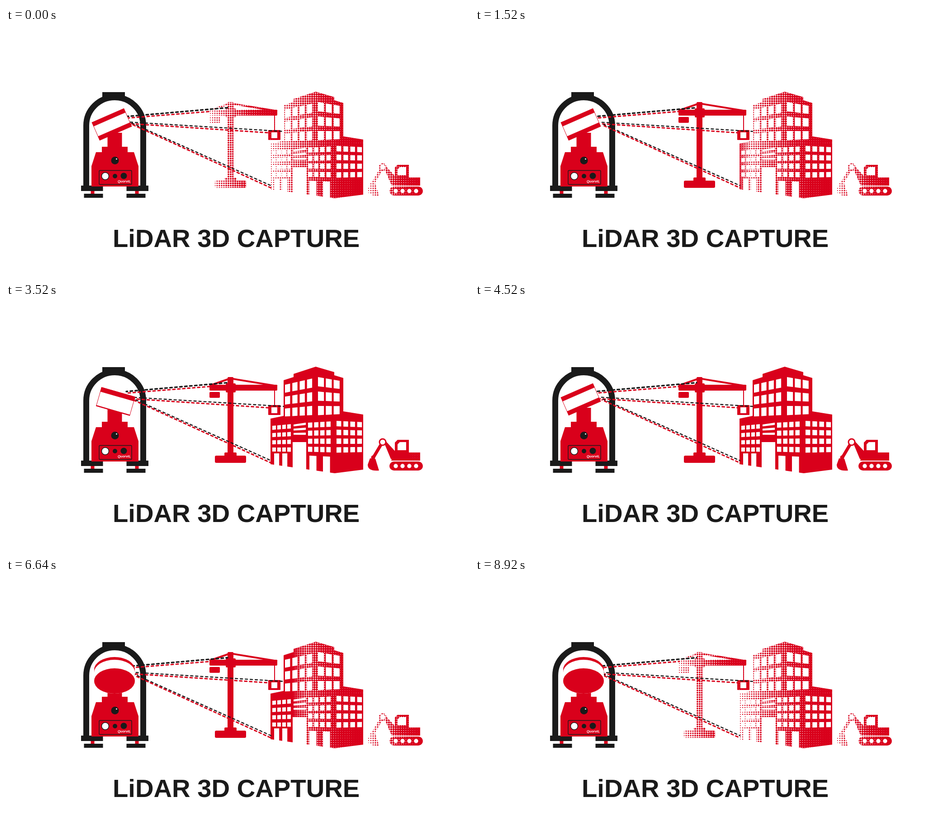
Write an HTML page that moves like this. It is 1024x547 px and loops after 8.96 s.

```html
<!DOCTYPE html>
<html lang="en">
<head>
<meta charset="utf-8">
<title>LiDAR 3D capture</title>
<style>
  html, body { margin: 0; width: 100%; height: 100%; overflow: hidden; background: #fff; }
  svg { display: block; width: 100%; height: 100%; }
  .red { fill: #d9001b; }
  .ink { fill: #1a1a1a; }
  .white { fill: #fff; }
  .beam { fill: none; stroke-linecap: round; stroke-dasharray: 5 6; }
  text { font-family: "Liberation Sans", Arial, sans-serif; font-weight: bold; }
</style>
</head>
<body>
<svg id="stage" viewBox="0 0 1024 547"></svg>
<script>
const LOOP = 8960, SPIN = 750, CELL = 5, AXIS = 240.5;
const RED = '#d9001b', INK = '#1a1a1a';
const stage = document.getElementById('stage');

const lerp = (a, b, k) => a + (b - a) * k;
const range = n => [...Array(n).keys()];
const rect = (x1, y1, x2, y2, r = 0, attrs = '') =>
  `<rect x="${x1}" y="${y1}" width="${x2 - x1}" height="${y2 - y1}" rx="${r}" ${attrs}/>`;
const circle = (x, y, r, attrs = '') => `<circle cx="${x}" cy="${y}" r="${r}" ${attrs}/>`;
const shape = d => `<path d="${d}"/>`;
const line = (d, w) => `<path d="${d}" fill="none" stroke="#fff" stroke-width="${w}" stroke-linejoin="round"/>`;
const hole = shapes => `<g fill="#000">${shapes}</g>`;
// Box of half width w centred on the scanner, and a pair mirrored about its axis.
const centred = (w, y1, y2, r = 0, attrs = '') => rect(AXIS - w, y1, AXIS + w, y2, r, attrs);
const pair = (near, far, y1, y2) =>
  rect(AXIS - far, y1, AXIS - near, y2) + rect(AXIS + near, y1, AXIS + far, y2);

// Even grid of windows on a wall seen in perspective.
// left and right give [top, bottom]; fx and fy are the glazed share of a cell.
function windows(x1, x2, left, right, cols, rows, fx, fy) {
  const at = (u, v) => `${lerp(x1, x2, u)} ${lerp(lerp(left[0], left[1], v), lerp(right[0], right[1], v), u)}`;
  return range(cols * rows).map(i => {
    const c = i % cols, r = Math.floor(i / cols);
    const u = c / cols, u2 = (c + fx) / cols, v = r / rows, v2 = (r + fy) / rows;
    return shape(`M${at(u, v)}L${at(u2, v)}L${at(u2, v2)}L${at(u, v2)}Z`);
  }).join('');
}

const crane =
  rect(490, 164, 503, 335, 2) + rect(486, 178, 508, 198, 2) + rect(450, 181, 600, 194, 2) +
  line('M450 183L496 167L600 184', 4) + rect(450, 197, 473, 210, 2) +
  line('M594 193V228', 2) + rect(580, 226, 607, 248, 1) +
  rect(483, 331, 510, 342, 2) + rect(462, 338, 531, 354, 3) +
  hole(rect(587, 231, 600, 244));

const building =
  shape('M585 256L614 250V171L636 164V157L685 141L726 153V160L746 166V240L790 247V369L727 377L585 357Z') +
  hole(
    windows(617, 682, [181, 260], [166, 258], 4, 3, .7, .67) +
    windows(690, 742, [164, 260], [173, 256], 3, 3, .76, .64) +
    windows(589, 633, [272, 336], [268, 337], 4, 4, .72, .56) +
    windows(636, 663, [269, 297], [265, 298], 1, 3, 1, .45) +
    windows(668, 722, [265, 336], [262, 338], 4, 4, .7, .63) +
    windows(731, 792, [261, 339], [264, 337], 4, 4, .68, .62) +
    windows(593, 629, [333, 380], [333, 380], 2, 1, .62, 1) +
    windows(671, 731, [338, 380], [341, 380], 2, 1, .52, 1) +
    rect(634, 308, 664, 380));

const digger =
  shape('M852 349L860 328V309L866 303H891V331H916V349Z') +
  shape('M836 309L841 307L864 332L858 349L851 345Z') +
  line('M831 311L812 343', 7) + circle(833, 308, 8.5) + circle(812, 342, 4.5) +
  shape('M805 344L817 345L825 371Q800 373 800 358Z') +
  rect(848, 351, 922, 371, 10) +
  hole(circle(833, 308, 5.5) + shape('M866 313L871 308H885V326H866Z') +
    range(4).map(i => circle(862 + 15 * i, 361, 4.7)).join(''));

// Each scene part is wiped from dots to solid between on[], and back between off[].
const parts = [
  { id: 'crane', art: crane, x1: 450, x2: 607, y1: 162, y2: 356, on: [320, 1400], off: [7150, 8300] },
  { id: 'building', art: building, x1: 585, x2: 790, y1: 140, y2: 378, on: [1400, 2450], off: [5750, 7100] },
  { id: 'digger', art: digger, x1: 800, x2: 922, y1: 298, y2: 373, on: [2650, 3750], off: [4640, 5600] }
];

// Dots grow from left to right until they almost close up.
function halftone({ x1, x2, y1, y2 }) {
  let d = '';
  for (let x = x1 + 2; x < x2 + CELL; x += CELL) {
    const u = Math.min(1, (x - x1) / (x2 - x1));
    const r = (.9 + 2.4 * u ** .6).toFixed(2);
    for (let y = y1 + 2; y < y2 + CELL; y += CELL)
      d += `M${x - r} ${y}a${r} ${r} 0 1 0 ${2 * r} 0a${r} ${r} 0 1 0 ${-2 * r} 0`;
  }
  return d;
}

const partSvg = p => `
  <mask id="${p.id}" maskUnits="userSpaceOnUse" x="0" y="0" width="1024" height="547"><g fill="#fff">${p.art}</g></mask>
  <linearGradient id="${p.id}-wipe" gradientUnits="userSpaceOnUse" x1="0" y1="0" x2="30" y2="0">
    <stop offset="0" stop-color="${RED}"/><stop offset="1" stop-color="${RED}" stop-opacity="0"/>
  </linearGradient>
  <g mask="url(#${p.id})">
    <path class="red" d="${halftone(p)}"/>
    ${rect(p.x1 - 3, p.y1 - 3, p.x2 + 3, p.y2 + 3, 0, `fill="url(#${p.id}-wipe)"`)}
  </g>`;

// A black ray out and a red ray back just below it, cut short at share k.
const beam = (d, w, color, dir) =>
  `<path class="beam" d="${d}" stroke="${color}" stroke-width="${w}" data-dir="${dir}"/>`;
const ray = (x1, y1, x2, y2, w, k) =>
  beam(`M${x1} ${y1}L${x2} ${y2}`, w, INK, 1) +
  beam(`M${x1 + 2} ${y1 + 3.5}L${lerp(x1, x2, k)} ${lerp(y1, y2, k) + 5}`, 3, RED, -1);
const beams =
  ray(266, 196, 490, 176.5, 3.4, .83) +
  ray(275, 208.5, 614, 229, 2.4, .9) +
  ray(279, 211, 586, 349, 2.4, 1);

const frame =
  `<path d="M177.5 352V216A63 62.5 0 0 1 303.5 216V352" fill="none" stroke="${INK}" stroke-width="13"/>` +
  `<g class="ink">${rect(213, 142, 263, 157) + pair(26, 74.5, 349, 361) + pair(26, 68, 367, 376)}</g>` +
  `<g class="red">${pair(45, 53, 361, 367)}</g>`;

const base =
  `<g class="red">${shape('M189 351V306L199 275H283L293 306V351Z') +
    centred(28.5, 263, 276) + centred(16, 232, 264)}</g>` +
  `<g class="ink">${circle(241, 293.5, 8.5) + circle(241, 328, 5) + circle(260.5, 327.5, 7)}</g>` +
  circle(244.5, 290, 1.5, 'class="white"') +
  circle(219.5, 328, 8, `class="white" stroke="${INK}" stroke-width="1.5"`) +
  rect(206, 315.5, 278, 346.5, 2, `fill="none" stroke="${INK}" stroke-width="1.4"`) +
  `<text x="247" y="342" class="white" font-size="7.5" font-style="italic">QuorviL</text>`;

const drum = (x, y, angle, art) =>
  `<g class="drum" transform="translate(${x} ${y}) rotate(${angle})">${art}</g>`;

// Drum seen from the side: white body between two red bands.
const sideDrum = (x, y, angle, top, bottom) => drum(x, y, angle,
  rect(-38.5, -21.5, 38.5, 21.5, 0, `class="white" stroke="${RED}" stroke-width=".9"`) +
  `<g class="red">${rect(-38.8, -21.8, 38.8, top - 21.5) + rect(-38.8, 21.5 - bottom, 38.8, 21.8)}</g>`);

// Drum with one face turned to the viewer.
function faceDrum(x, y, angle, a, b, body, back) {
  const shell = h => `M${-a} 0V${-h}A${a} ${b} 0 0 1 ${a} ${-h}V0A${a} ${b} 0 0 1 ${-a} 0Z`;
  return drum(x, y, angle,
    `<path class="red" d="${shell(back)}"/><path class="white" d="${shell(body)}"/>` +
    `<ellipse class="red" rx="${a}" ry="${b}"/>`);
}

const drums =
  sideDrum(234, 213.5, -23.6, 9.5, 9.5) +
  faceDrum(253, 207, 230, 43, 29, 15, 20) +
  sideDrum(242.5, 218, 16, 10, 2) +
  faceDrum(240, 228, 0, 45, 28, 19, 25);

stage.innerHTML = parts.map(partSvg).join('') + frame + beams + base + drums +
  `<text x="236" y="484.5" class="ink" font-size="56.2">LiDAR 3D CAPTURE</text>`;

const drumEls = [...stage.querySelectorAll('.drum')];
const beamEls = [...stage.querySelectorAll('.beam')];
const wipeEls = parts.map(p => document.getElementById(p.id + '-wipe'));
const ramp = (t, [a, b]) => Math.min(1, Math.max(0, (t - a) / (b - a)));

function draw(t) {
  parts.forEach((p, i) => {
    const k = ramp(t, p.on) - ramp(t, p.off);
    const edge = lerp(p.x1 - 8, p.x2 + 28, k);
    wipeEls[i].setAttribute('x1', edge - 25);
    wipeEls[i].setAttribute('x2', edge + 5);
  });
  const pose = Math.floor(t % SPIN / SPIN * drumEls.length);
  drumEls.forEach((el, i) => el.setAttribute('visibility', i === pose ? 'visible' : 'hidden'));
  beamEls.forEach(el => el.setAttribute('stroke-dashoffset', -el.dataset.dir * t * .04 % 11));
}

const start = performance.now();
function tick() {
  draw((performance.now() - start) % LOOP);
  requestAnimationFrame(tick);
}
tick();
</script>
</body>
</html>
```
